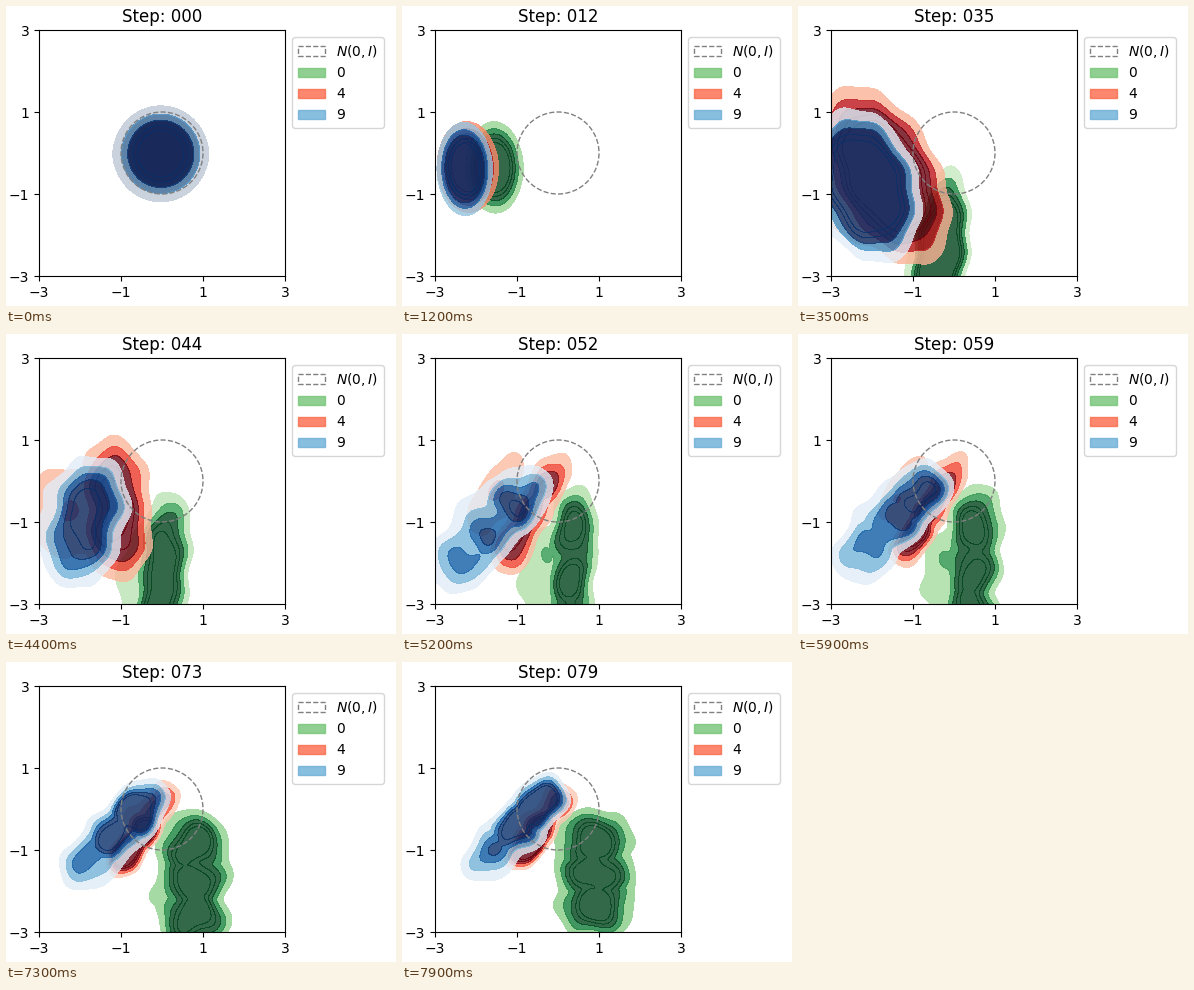
Write a matplotlib script that moves like this. It is 390 px wide and 300 px high and loops after 8000 ms.

```python
import numpy as np
import matplotlib.pyplot as plt
from matplotlib.animation import FuncAnimation
from matplotlib.patches import Ellipse, Patch

FRAMES, INTERVAL = 80, 100
ALPHA = 0.8
LOW = 0.2
LEVELS = [LOW, 0.36, 0.52, 0.68, 0.84, 99]
KEYS = [0, 12, 23, 35, 52, 79]
START = (-0.03, 1.12, -0.03, -1.16, 1.12)


class Cloud:
    """A density drifting along a path of bodies: head x, y, tail x, y, width."""

    def __init__(self, label, cmap, tones, lean, drop, shift, path):
        self.label, self.cmap = label, plt.get_cmap(cmap)
        self.tones, self.lean, self.drop, self.shift = tones, lean, drop, shift
        self.path = np.array([START] + path).T

    def body(self, step):
        hx, hy, tx, ty, width = (np.interp(step, KEYS, track) for track in self.path)
        dip = np.sin(np.pi * min(step / KEYS[1], 1))
        head, tail = np.array([hx, hy - dip]), np.array([tx, ty - dip])
        return (head + tail) / 2, (head - tail) / 2, width

    def field(self, step):
        mid, half, width = self.body(step)
        length = np.hypot(*half)
        axis = half / length
        normal = np.array([axis[1], -axis[0]])
        split, shed = ramp(step, 35, 52), bump(step, 52, 13)
        peak = 1.2 + 1.5 * surge(step) - self.drop * shed
        lean = self.lean * ramp(step, 35, 79)

        # A pale halo slides sideways while the body splits into three lobes.
        halo = mid - normal * self.shift * width * shed
        lobes = [(halo, 0.65 * length, 0.35)]
        for i in (-1, 0, 1):
            lobes.append((mid + 0.5 * i * split * half,
                          length * (1 - 0.45 * split), peak * (1 + lean * i)))

        wobble = 0.04 * ramp(step, 12, 23)
        x = X + wobble * np.sin(6 * Y + 0.2 * step)
        y = Y + wobble * np.sin(7 * X + 0.15 * step)
        total = 0
        for (cx, cy), size, top in lobes:
            u = ((x - cx) * axis[0] + (y - cy) * axis[1]) / size
            v = ((x - cx) * normal[0] + (y - cy) * normal[1]) / width
            total = total + (LOW * (top / LOW) ** (1 - u * u - v * v)) ** 12
        ripple = 1 + 0.2 * split * np.sin(5 * X) * np.sin(4 * Y + 0.1 * step)
        return total ** (1 / 12) * ripple

    def colors(self, step):
        base = np.interp(step, [0, 12, 23, 79], [0.27, 0.4, *self.tones])
        gain = 0.36 + 0.36 * surge(step)
        return list(self.cmap(np.clip(base + gain * np.arange(len(LEVELS) - 1), 0, 1)))


def ramp(step, a, b):
    t = np.clip((step - a) / (b - a), 0, 1)
    return t * t * (3 - 2 * t)


def bump(step, centre, spread):
    return np.exp(-((step - centre) / spread) ** 2)


def surge(step):
    return bump(step, 26, 10)


X, Y = np.meshgrid(np.linspace(-3, 3, 130), np.linspace(-3, 3, 130))

clouds = [
    Cloud("0", "Greens", (0.20, 0.45), 0.0, 0.2, 0.9, [
        (-1.57, 0.74, -1.52, -1.44, 0.67),
        (-0.95, 0.85, 0.00, -3.70, 0.75),
        (-0.10, -0.40, -0.60, -4.60, 0.70),
        (0.45, -0.20, 0.15, -4.60, 0.62),
        (0.85, -0.05, 0.95, -3.10, 0.97)]),
    Cloud("4", "Reds", (0.30, 0.20), -0.4, 0.45, 2.0, [
        (-2.25, 0.74, -2.15, -1.42, 0.72),
        (-2.90, 1.80, -0.45, -2.60, 1.25),
        (-2.80, 1.50, -0.60, -2.60, 1.30),
        (0.10, 0.60, -1.40, -2.20, 0.48),
        (0.25, 0.55, -1.10, -1.40, 0.42)]),
    Cloud("9", "Blues", (0.10, 0.12), 0.45, 0.45, 0.3, [
        (-2.30, 0.72, -2.25, -1.50, 0.65),
        (-3.00, 1.50, -1.20, -2.40, 1.30),
        (-2.75, 1.00, -1.55, -2.60, 1.25),
        (-0.40, 0.15, -2.90, -2.50, 0.75),
        (0.05, 0.65, -2.10, -1.60, 0.62)]),
]

fig = plt.figure(figsize=(3.9, 3), dpi=100)
ax = fig.add_axes([33 / 390, 30 / 300, 246 / 390, 246 / 300])
ax.set(xlim=(-3, 3), ylim=(-3, 3), xticks=[-3, -1, 1, 3], yticks=[-3, -1, 1, 3])
title = ax.set_title("Step: 000")
prior = Ellipse((0, 0), 2, 2, fill=False, ec="gray", ls="--", lw=1, zorder=2,
                label="$N(0, I)$")
ax.add_patch(prior)
swatches = [Patch(color=c.cmap(0.5), alpha=ALPHA, label=c.label) for c in clouds]
ax.legend(handles=[prior] + swatches, loc="upper left", bbox_to_anchor=(1, 1))

layers = []


def draw(step):
    while layers:
        layers.pop().remove()
    for cloud in clouds:
        layers.append(ax.contourf(X, Y, cloud.field(step), levels=LEVELS,
                                  colors=cloud.colors(step), alpha=ALPHA))
    title.set_text(f"Step: {step:03d}")
    return [title]


anim = FuncAnimation(fig, draw, frames=FRAMES, interval=INTERVAL,
                     init_func=lambda: draw(0), repeat=True, repeat_delay=0)
plt.show()
```
